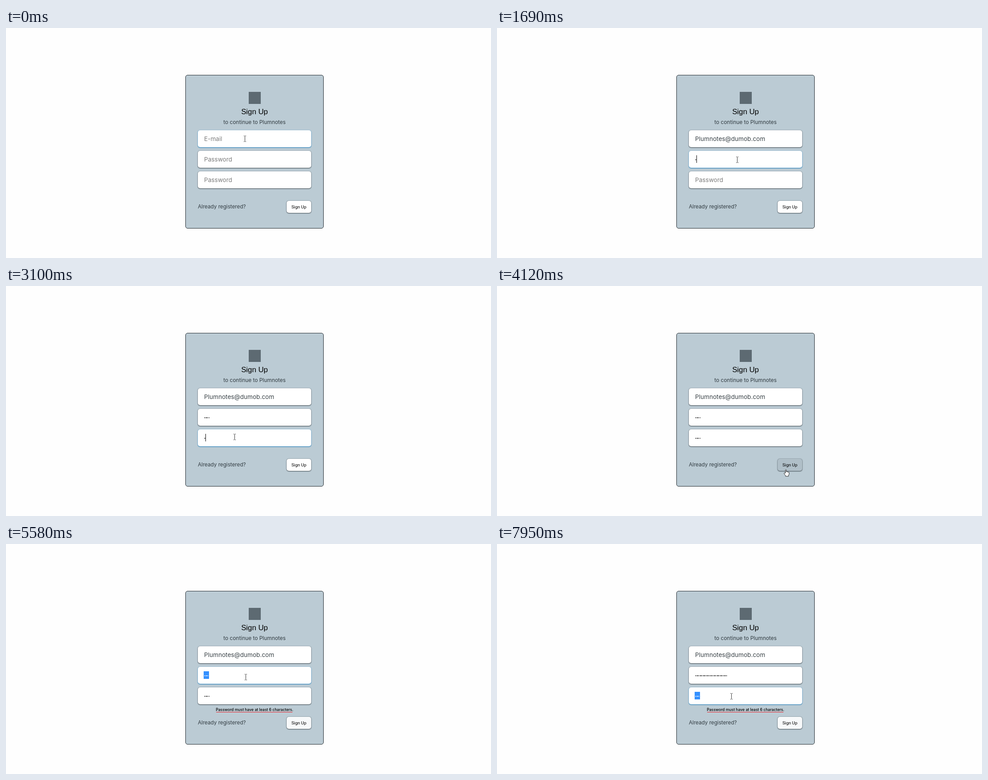
Recreate the animation shown at these times as an HTML page. Size 1087 px wide and 515 px high, loop 8000 ms.

```html
<!DOCTYPE html>
<html lang="en">
<head>
<meta charset="utf-8">
<title>Sign up form</title>
<style>
html, body { margin: 0; width: 100%; height: 100%; overflow: hidden; background: #fefefe; }
body { position: relative; font-family: Inter, "Open Sans", sans-serif; color: #323c42; }
div, svg { position: absolute; box-sizing: border-box; }
.card { left: 402px; top: 105px; width: 310px; height: 344px; background: #bbcbd4; border: 1px solid #20282d; border-radius: 5px; }
.logo { left: 544px; top: 143px; width: 27px; height: 27px; background: #5d6a72; }
.text { white-space: pre; line-height: 20px; height: 20px; }
.center { left: 402px; width: 310px; text-align: center; }
.title { top: 178px; font: 16.8px/20px "Liberation Sans", Arial, sans-serif; color: #000; }
.subtitle { top: 201px; font-size: 11.9px; }
.link { left: 430px; top: 390px; font-size: 11.7px; }
.error { top: 361px; font-size: 8.6px; font-weight: 500; color: #000; }
.error::after { content: ""; position: absolute; left: 69px; top: 15px; width: 171px; height: 1px; background: #e8232b; }
.field { left: 430px; width: 254px; height: 38px; background: #fff; border-radius: 5px; }
.label { left: 14px; top: 9px; font-size: 13.6px; }
.selection { left: 13px; top: 10px; width: 12px; height: 17px; background: #3390ff; }
.dots { left: 14px; top: 19px; height: 2px;
  background: repeating-linear-gradient(90deg, transparent .4px, currentColor .8px 2.2px, transparent 2.6px 3.85px); }
.caret { top: 10px; width: 1px; height: 17px; background: #000; }
.button { left: 629px; top: 387px; width: 55px; height: 27px; border-radius: 5px; color: #000;
  font: 9.8px/27px Roboto, Arial, sans-serif; text-align: center; box-shadow: 0 1px 2px #465057, 0 0 2px #59646b; }
.cursor { left: 0; top: 0; width: 1px; height: 1px; overflow: visible; }
</style>
</head>
<body>
<div class="card"></div>
<div class="logo"></div>
<div class="text center title">Sign Up</div>
<div class="text center subtitle">to continue to Plumnotes</div>
<div class="text center error">Password must have at least 6 characters.</div>
<div class="text link">Already registered?</div>
<div class="button">Sign Up</div>
<svg class="cursor">
  <path id="beam" d="M-2.5-6.5H-1L0-5.5 1-6.5H2.5M0-5.5V5.5M-2.5 6.5H-1L0 5.5 1 6.5H2.5" fill="none" stroke="#333"/>
  <path id="arrow" d="M0 0V14L3.2 11 5.4 16 7.6 15 5.4 10.3H10Z" fill="#fff" stroke="#111" stroke-width=".9"/>
  <path id="hand" d="M-1 8V.8Q0-.8 1 .8V5Q2.2 4 3.2 5.4 4.6 4.6 5.3 6 7 5.4 7.2 7.2V10.5L5.8 13V15H-.8V13.5L-4 9.2Q-4.2 7.2-2.6 7.3Z" fill="#fff" stroke="#111" stroke-width=".9"/>
</svg>
<script>
const LOOP = 8000;
const FADE = 150;
const DOT_PITCH = 3.85;
const EMAIL = "Plumnotes@dumob.com";
const $ = selector => document.querySelector(selector);
const button = $(".button"), error = $(".error"), cursor = $(".cursor");

// Focus, caret and selection are [start, end] spans; typed holds [time, dot count].
const fields = [
  { top: 229, focus: [[-FADE, 1130]], caret: [], selected: [], typed: [] },
  { top: 275, focus: [[1130, 2740], [5160, 7560]], caret: [[1690, 2400], [7160, 7560]],
    selected: [[5490, 7160]], typed: [[1690, 1], [2030, 2], [2400, 3], [7160, 19]] },
  { top: 321, focus: [[2740, 3760], [7560, LOOP + FADE]], caret: [[3100, 3760]],
    selected: [[7860, LOOP]], typed: [[3100, 1], [3310, 2], [3480, 3]] }
];

const mousePath = [
  [0, 535, 248], [710, 535, 248], [1260, 538, 295], [2580, 538, 295], [2850, 512, 338],
  [3400, 512, 338], [3940, 647, 411], [4120, 647, 411], [4390, 645, 404], [5010, 645, 404],
  [5310, 538, 296], [5490, 538, 296], [5580, 537, 298], [7260, 537, 298], [7640, 525, 341], [LOOP, 525, 341]
];

function add(parent, className) {
  const node = document.createElement("div");
  node.className = className;
  parent.append(node);
  return node;
}

for (const field of fields) {
  field.box = add(document.body, "field");
  field.box.style.top = field.top + "px";
  field.label = add(field.box, "text label");
  field.selection = add(field.box, "selection");
  field.dots = add(field.box, "dots");
  field.caretLine = add(field.box, "caret");
}
document.body.append(cursor);

const clamp = x => Math.max(0, Math.min(1, x));
const ease = x => x * x * (3 - 2 * x);
const mix = (from, to, k) => `rgb(${from.map((v, i) => v + (to[i] - v) * k)})`;
const within = (spans, t) => spans.some(([start, end]) => t >= start && t < end);
const show = (node, on) => { node.style.display = on ? "block" : "none"; };

function mouseAt(t) {
  const i = mousePath.findIndex(([time]) => time > t);
  const [t0, x0, y0] = mousePath[i - 1], [t1, x1, y1] = mousePath[i];
  const k = ease((t - t0) / (t1 - t0));
  return [x0 + (x1 - x0) * k, y0 + (y1 - y0) * k];
}

function drawField(field, index, t) {
  const glow = Math.max(...field.focus.map(([start, end]) =>
    clamp((t - start) / FADE) * clamp((end + FADE - t) / FADE)));
  const edge = mix([110, 121, 128], [116, 172, 208], glow);
  const shade = mix([62, 72, 78], [28, 122, 182], glow);
  field.box.style.boxShadow = `0 1px 2px ${shade}, 0 0 2px ${edge}`;

  const count = field.typed.reduce((n, [time, value]) => t >= time ? value : n, 0);
  const selected = within(field.selected, t);
  const hasEmail = index === 0 && t >= 250;
  field.label.textContent = hasEmail ? EMAIL : index ? "Password" : "E-mail";
  field.label.style.color = hasEmail ? "#3a4348" : "#7c7c7c";
  show(field.label, !count);
  show(field.selection, selected);
  field.dots.style.width = count * DOT_PITCH + "px";
  field.dots.style.color = selected ? "#fff" : "#111";
  field.caretLine.style.left = Math.round(13 + count * DOT_PITCH) + "px";
  show(field.caretLine, within(field.caret, t));
}

function drawMouse(t) {
  const [x, y] = mouseAt(t);
  const overField = x > 430 && x < 684 && fields.some(f => y >= f.top && y < f.top + 38);
  const overButton = x > 629 && x < 684 && y > 387 && y < 414;
  const kind = overField ? "beam" : overButton ? "hand" : "arrow";
  for (const shape of cursor.children) show(shape, shape.id === kind);
  cursor.style.transform = `translate(${Math.round(x) + 0.5}px, ${Math.round(y)}px)`;
}

function draw(now) {
  const t = now % LOOP;
  fields.forEach((field, index) => drawField(field, index, t));
  const hover = t < 5060 ? clamp((t - 3780) / 160) : 1 - 0.9 * clamp((t - 5060) / 250);
  button.style.background = mix([255, 255, 255], [176, 191, 200], hover);
  show(error, t >= 5010);
  drawMouse(t);
}

const start = performance.now();
function tick() {
  draw(performance.now() - start);
  requestAnimationFrame(tick);
}
tick();
</script>
</body>
</html>
```
